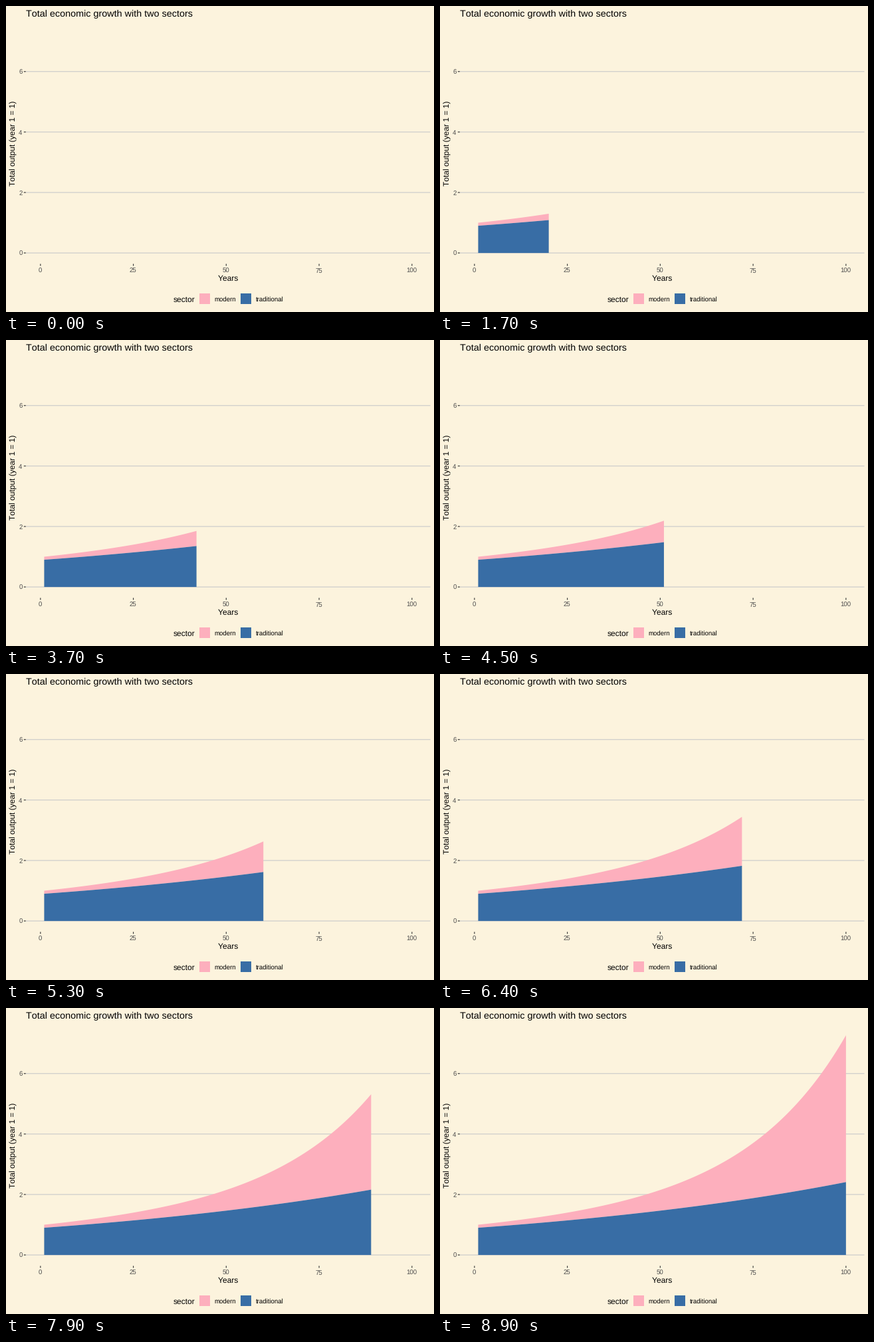
Animation of 644x461 px, one loop 10 s. Source, as a matplotlib script:

```python
import matplotlib.pyplot as plt
import numpy as np
from matplotlib.animation import FuncAnimation
from matplotlib.patches import Polygon, Rectangle

W, H, DPI = 644, 461, 64
PAPER, GRID, TICK, TICK_TEXT = "#FCF3DD", "#CACACA", "#333333", "#4D4D4D"
PINK, BLUE = "#FDAFBD", "#386DA5"

YEARS = 100
FRAMES, REVEAL = 100, 89          # the remaining frames hold the full chart
LEFT, RIGHT, BOTTOM = 29.8, 638.5, 388.5
LINE = 1.16

plt.rcParams.update({
    "font.family": "Liberation Sans",
    "text.hinting": "none",
    "text.kerning_factor": 6,     # plain advance widths, no pair kerning
    "toolbar": "None",
})

fig = plt.figure(figsize=(W / DPI, H / DPI), dpi=DPI, facecolor=PAPER)
ax = fig.add_axes([0, 0, 1, 1])
ax.set_xlim(0, W)
ax.set_ylim(H, 0)
ax.axis("off")


def px(year):
    return 51.85 + 5.59 * year


def py(value):
    return 372.05 - 45.55 * value


def label(x, y, text, size, color="black", ha="left", **kw):
    ax.text(x, y, text, fontsize=size * 72 / DPI, color=color,
            ha=ha, va="baseline", **kw)


def line(xs, ys, color):
    ax.plot(xs, ys, color=color, lw=LINE * 72 / DPI, snap=False,
            solid_capstyle="butt", zorder=1)


def area(color):
    patch = Polygon(np.zeros((3, 2)), closed=True, fc=color, lw=0,
                    snap=False, zorder=2)
    ax.add_patch(patch)
    return patch


def key(x, color, text):
    ax.add_patch(Rectangle((x, 433), 16, 16, fc=color, lw=0, snap=False))
    label(x + 22.4, 445, text, 9.6)


# Axes
for v in (0, 2, 4, 6):
    y = py(v)
    line([LEFT, RIGHT], [y, y], GRID)
    line([LEFT - 3, LEFT], [y, y], TICK)
    label(24.6, y + 4, str(v), 9.6, TICK_TEXT, "right")
for t in (0, 25, 50, 75, 100):
    x = px(t)
    line([x, x], [BOTTOM, BOTTOM + 3], TICK)
    label(x - 0.3, 402, str(t), 9.6, TICK_TEXT, "center")

# Titles and legend
label(29.8, 16.2, "Total economic growth with two sectors", 14.4)
label(334.2, 414, "Years", 12, ha="center")
label(14.6, 206.6, "Total output (year 1 = 1)", 12, ha="center",
      rotation=90, rotation_mode="anchor")
label(251.4, 446, "sector", 12)
key(291, PINK, "modern")
key(353, BLUE, "traditional")

# Two sectors growing at 1% and 4% a year
years = np.arange(1, YEARS + 1)
traditional = 0.9 * 1.01 ** (years - 1)
total = traditional + 0.1 * 1.04 ** (years - 1)
modern_area, traditional_area = area(PINK), area(BLUE)


def band(n, low, high):
    x = px(years[:n])
    return np.column_stack([np.r_[x, x[::-1]],
                            np.r_[py(high[:n]), py(low[:n])[::-1]]])


def draw(frame):
    step = min(frame, REVEAL)
    n = 1 + int((step + 0.5) * (YEARS - 1) / REVEAL)
    modern_area.set_xy(band(n, traditional, total))
    traditional_area.set_xy(band(n, 0 * total, traditional))
    for patch in (modern_area, traditional_area):
        patch.set_visible(n > 1)
    return modern_area, traditional_area


anim = FuncAnimation(fig, draw, frames=FRAMES, interval=100,
                     repeat=True, repeat_delay=0, blit=False)
plt.show()
```
